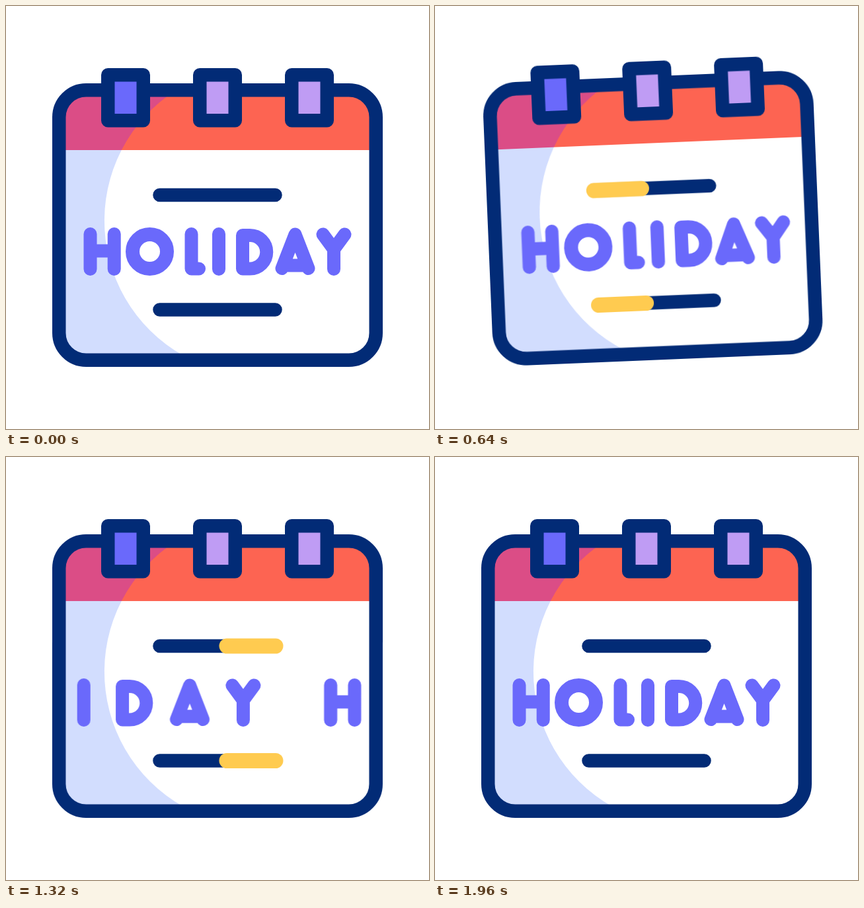
An HTML page without scripts that plays this animation: 640x640 px, repeating every 2000 ms.

```html
<!DOCTYPE html>
<html lang="en">
<head>
<meta charset="utf-8">
<title>Holiday calendar</title>
<style>
html, body { margin: 0; height: 100%; overflow: hidden; background: #fff; }
svg { display: block; width: 100vw; height: 100vh; }

.navy { stroke: #022b76; stroke-width: 20.5; stroke-linecap: round; stroke-linejoin: round; }
.glyph { fill: none; stroke: #6a69fb; stroke-width: 20; stroke-linecap: round; stroke-linejoin: round; }

.bob, .swing { animation: bob 2s cubic-bezier(.333, 0, .667, 1) infinite; }
.swing { animation-name: swing; transform-origin: 320px 98px; }
@keyframes bob {
  0%, 6% { transform: translateY(0); }
  22% { transform: translateY(21px); }
  37% { transform: translateY(-21px); }
  53%, 100% { transform: translateY(0); }
}
@keyframes swing {
  0%, 6% { transform: rotate(0deg); }
  22% { transform: rotate(10deg); }
  38% { transform: rotate(-8deg); }
  58% { transform: rotate(2.2deg); }
  76% { transform: rotate(-3deg); }
  92.5%, 100% { transform: rotate(0deg); }
}

/* --k: letter index, --d: distance left to travel near the end */
.out use { animation: leave 2s linear infinite; }
.in use { animation: enter 2s linear infinite; }
@keyframes leave {
  0% { transform: translateX(0); }
  30% { transform: translateX(0); animation-timing-function: cubic-bezier(.35, 0, .7, .65); }
  52% { transform: translateX(calc(175px + 21.5px * var(--k))); }
  66% { transform: translateX(calc(363px + 22px * var(--k))); }
  80%, 100% { transform: translateX(calc(560px + 22px * var(--k))); }
}
@keyframes enter {
  0% { transform: translateX(-604px); }
  30% { transform: translateX(-604px); animation-timing-function: cubic-bezier(.35, 0, .7, .65); }
  52% { transform: translateX(calc(-430px + 21.8px * var(--k))); }
  66% { transform: translateX(calc(-272px + 22.4px * var(--k))); }
  74% { transform: translateX(calc(-181px + 20.5px * var(--k))); animation-timing-function: cubic-bezier(.3, .35, .7, .8); }
  82% { transform: translateX(calc(-1px * var(--d))); animation-timing-function: cubic-bezier(.2, .36, .5, 1); }
  97%, 100% { transform: translateX(0); }
}

.k0 { --k: 0; --d: 92; }
.k1 { --k: 1; --d: 73; }
.k2 { --k: 2; --d: 60.5; }
.k3 { --k: 3; --d: 35; }
.k4 { --k: 4; --d: 19.5; }
.k5 { --k: 5; --d: 5.5; }
.k6 { --k: 6; --d: 2; }

.fill { stroke: #ffcb50; stroke-width: 23; stroke-linecap: round; animation: show 2s step-end infinite; }
@keyframes show {
  0% { opacity: 0; }
  14% { opacity: 1; }
  92%, 100% { opacity: 0; }
}
</style>
</head>
<body>
<svg viewBox="0 0 640 640" role="img" aria-label="HOLIDAY">
  <defs>
    <clipPath id="page"><rect x="80.25" y="127.25" width="479.5" height="408.5" rx="41"/></clipPath>
    <clipPath id="shade"><path d="M80 127H258A234 234 0 0 0 282 536H80Z"/></clipPath>
    <g class="glyph">
      <path id="h" d="M127.5 345V398M163.7 345V398M127.5 370.5H163.7"/>
      <circle id="o" cx="217.5" cy="371.5" r="26" stroke-width="21"/>
      <path id="l" d="M280.5 345V397.5H292"/>
      <path id="i" d="M322 345V398"/>
      <path id="d" d="M358 347V397.5H369A25.25 25.25 0 0 0 369 347Z"/>
      <path id="a" d="M417.5 397L437.5 345.5L457.5 397M422 392.5H453"/>
      <path id="y" d="M479.5 345.5L496 368L512.5 345.5M496 368V398"/>
    </g>
    <rect id="ring" class="navy" x="154.25" y="104.25" width="53.5" height="69"/>
  </defs>

  <g class="bob"><g class="swing">
    <g clip-path="url(#page)">
      <path fill="#fff" d="M70 117H570V546H70Z"/>
      <path fill="#fd6452" d="M70 117H570V218H70Z"/>
      <g clip-path="url(#shade)">
        <path fill="#d2ddfe" d="M70 218H570V546H70Z"/>
        <path fill="#db4d86" d="M70 117H570V218H70Z"/>
      </g>

      <g class="out glyph">
        <use href="#h" class="k0"/><use href="#o" class="k1"/><use href="#l" class="k2"/><use href="#i" class="k3"/>
        <use href="#d" class="k4"/><use href="#a" class="k5"/><use href="#y" class="k6"/>
      </g>
      <g class="in glyph">
        <use href="#h" class="k0"/><use href="#o" class="k1"/><use href="#l" class="k2"/><use href="#i" class="k3"/>
        <use href="#d" class="k4"/><use href="#a" class="k5"/><use href="#y" class="k6"/>
      </g>
    </g>

    <path class="navy" d="M232.5 286H407.5M232.5 459.5H407.5"/>
    <g class="fill">
      <line id="bar" x1="232.5" y1="286" x2="232.5" y2="286">
        <animate attributeName="x1" dur="2s" repeatCount="indefinite" calcMode="spline"
          values="232.5;232.5;408;408" keyTimes="0;.34;.92;1"
          keySplines="0 0 1 1;.333 0 .667 1;0 0 1 1"/>
        <animate attributeName="x2" dur="2s" repeatCount="indefinite" calcMode="spline"
          values="232.5;232.5;408;408" keyTimes="0;.14;.55;1"
          keySplines="0 0 1 1;.333 0 .667 1;0 0 1 1"/>
      </line>
      <use href="#bar" y="173.5"/>
    </g>

    <rect class="navy" fill="none" x="80.25" y="127.25" width="479.5" height="408.5" rx="41"/>
    <use href="#ring" fill="#6a69fb"/>
    <use href="#ring" x="139" fill="#bf9cf4"/>
    <use href="#ring" x="278" fill="#bf9cf4"/>
  </g></g>
</svg>
</body>
</html>
```
